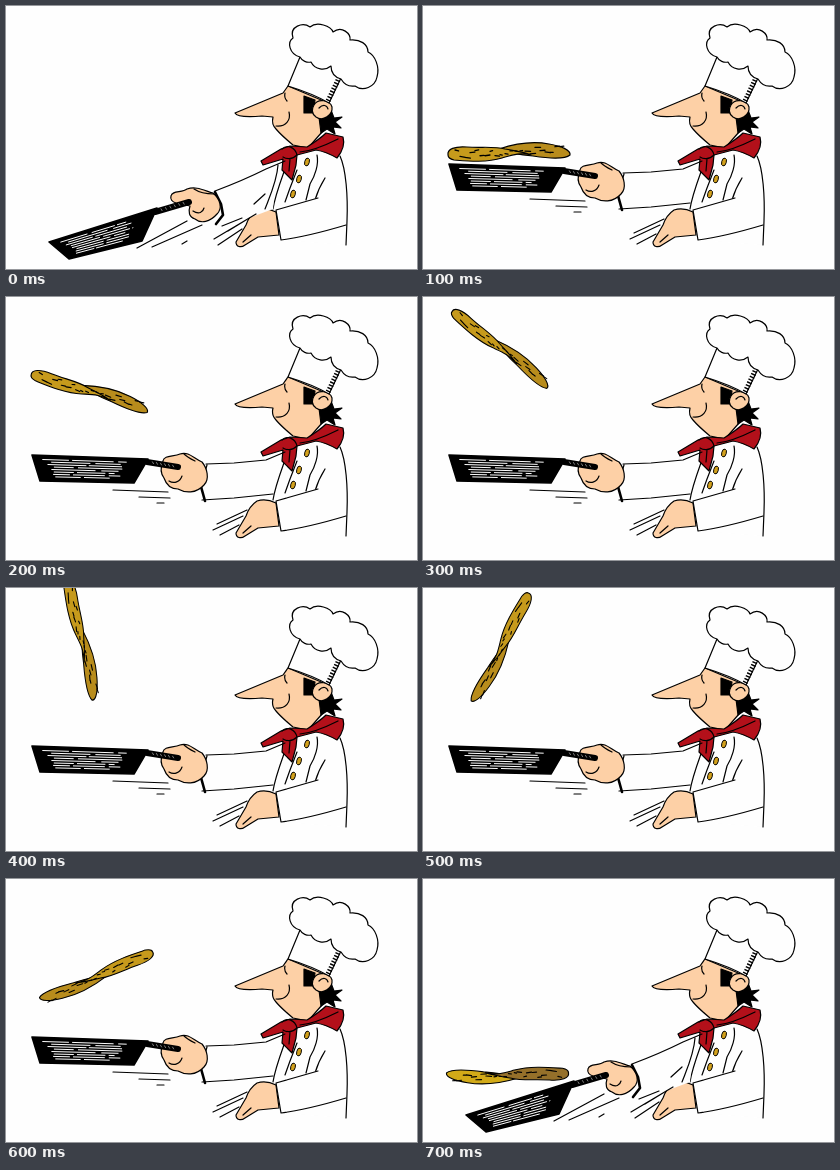
Write an HTML page that moves like this. It is 411x263 px and loops after 0.8 s.

```html
<!DOCTYPE html>
<html lang="en">
<head>
<meta charset="utf-8">
<title>Chef flipping a pancake</title>
<style>
html, body { margin: 0; width: 100%; height: 100%; overflow: hidden; background: #fefefe; }
svg { display: block; width: 100%; height: 100%; }
path { fill: none; stroke: #000; stroke-width: 1.2; stroke-linejoin: round; stroke-linecap: round; }
.skin { fill: #fdd0a6; }
.white { fill: #fefefe; }
.red { fill: #b3101a; }
.ink { fill: #000; }
.thick { stroke-width: 2.6; }
.streak { stroke: #fefefe; stroke-width: 1; stroke-linecap: butt; }
ellipse { fill: #d3a11c; stroke: #000; stroke-width: .9; }
</style>
</head>
<body>
<svg viewBox="0 0 411 263">
  <!-- jacket -->
  <path class="white" stroke="none" style="stroke:none" d="M272 158L312 145L334 150L341 190V239L276 234L268 200Z"/>
  <path d="M334 150C340 163 342 190 341 215L340 239"/>
  <path d="M311 149C313 158 309 170 304 178L300 194M279 163C274 177 269 190 267 203M291 164L284 182L279 196"/>
  <path d="M319 172C314 180 311 187 309 194"/>
  <ellipse cx="301" cy="156" rx="2.3" ry="4" transform="rotate(15 301 156)"/>
  <ellipse cx="293" cy="173" rx="2.3" ry="4" transform="rotate(15 293 173)"/>
  <ellipse cx="287" cy="188" rx="2.3" ry="4" transform="rotate(15 287 188)"/>

  <!-- resting arm -->
  <path class="skin" d="M270 206C264 203 257 202 251 204C245 208 242 213 240 219L230 236C230 241 235 242 239 239L252 231L273 229Z"/>
  <path d="M245 229L237 236"/>
  <path class="white" d="M312 192L270 204L275 235L340 220" style="stroke:none"/>
  <path d="M312 192L270 204L275 234C298 231 320 225 340 219"/>

  <!-- head -->
  <path class="skin" d="M282 80L277 87L229 107C231 111 244 111 256 110L267 111C266 115 267 120 270 123C275 129 281 134 287 139L302 142L316 126L320 96Z"/>
  <path d="M279 87C278 91 279 93 281 95M283 106C285 114 280 121 270 120"/>
  <path class="ink" d="M298 90L309 94L307 107H298ZM313 111L325 104L328 112L336 111L329 116L335 122L327 121L329 128L321 123L315 127Z"/>
  <path class="skin" d="M308 99C312 92 324 94 326 101C327 109 317 116 310 111C306 108 305 104 308 99"/>
  <path d="M313 102C317 98 321 99 322 103"/>

  <!-- hat -->
  <path class="white" d="M294 51L282 80C295 84 311 90 323 97L335 72L326 56Z"/>
  <path class="white" d="M294 51C283 48 281 36 287 32C283 20 297 16 304 21C311 15 325 20 327 26C336 19 345 28 344 34C354 33 362 38 362 46C369 49 374 61 371 71C369 81 357 86 349 80C343 81 338 78 335 73C328 71 325 66 325 60C319 65 309 64 305 56C301 57 296 55 294 51Z"/>
  <path id="hatch" class="thick" style="stroke-dasharray:1.4 1.7;stroke-linecap:butt;stroke-width:5" d="M332 74L322 95"/>

  <!-- neckerchief -->
  <path class="red" d="M255 155L275 143L284 140L301 141C309 136 315 132 320 127L337 131C339 138 336 146 331 152C324 148 316 145 310 144L291 149L290 159L286 174L276 164L277 153L257 159Z"/>
  <path d="M276 143C281 138 289 141 291 149C286 154 280 153 277 151M284 153L283 165M294 146C307 145 320 139 332 133"/>

  <g id="up">
    <path class="white" style="stroke:none" d="M200 167L259 163L274 169L266 199L199 204L195 185Z"/>
    <path d="M200 167L228 166L260 163L279 155M196 203L228 201L267 197M201 168L196 185"/>
    <path class="thick" d="M194 186L199 204"/>
    <path class="skin" d="M157 164C158 158 168 160 174 157C183 154 188 162 196 165C201 171 204 182 198 188C190 197 179 196 172 192C164 192 160 187 158 181C154 176 155 169 157 164Z"/>
    <path d="M178 157C181 160 185 162 189 164M163 184C168 187 174 185 176 179"/>
    <path d="M107 193L162 195M133 200L164 201M151 206H158M211 227L241 213M207 233L237 219M214 238L233 228"/>
  </g>

  <g id="down">
    <path class="white" style="stroke:none" d="M209 185L271 158L267 203L216 222Z"/>
    <path d="M209 185C225 179 244 171 260 163L279 155M272 159C271 175 264 190 259 203M216 220L236 212M248 198L259 188"/>
    <path class="thick" d="M209 186L215 198L217 209L210 218"/>
    <path class="skin" d="M165 190C166 184 176 187 181 183C190 180 197 184 207 187C214 193 217 202 211 208C204 216 195 218 189 213C183 211 182 206 184 200L170 197C166 196 164 193 165 190Z"/>
    <path d="M188 183C194 187 201 188 208 188M187 205C193 209 197 206 198 202"/>
    <path d="M131 242L181 215M146 241L196 219M176 238L181 235M208 233L250 208M212 239L236 223M222 225L240 214"/>
  </g>

  <g id="cake">
    <path id="right" d="M-10 -3C8 -9 24 -11 40 -8C52 -6 62 -2 61 3C55 8 37 6 24 4C12 3 0 1 -10 -3Z"/>
    <path id="left" d="M-61 3C-62 -3 -54 -6 -42 -5C-27 -4 -15 -6 -4 -3C6 -1 15 0 22 3C10 0 3 3 -7 6C-23 11 -42 9 -55 8C-59 7 -61 6 -61 3Z"/>
    <path id="spots" style="stroke-width:1.3"/>
  </g>
</svg>
<script>
const el = id => document.getElementById(id);

function random(seed) {
  return () => (seed = (seed * 16807) % 2147483647) / 2147483647;
}

function addPath(parent, d, cls, width) {
  const p = document.createElementNS('http://www.w3.org/2000/svg', 'path');
  p.setAttribute('d', d);
  p.setAttribute('class', cls);
  if (width) p.style.strokeWidth = width;
  parent.append(p);
}

// Corners run clockwise from the left end of the rim; streaks follow the sides.
function addPan(parent, corners, grip, seed) {
  const [a, b, c, d] = corners;
  const rnd = random(seed);
  const mix = (p, q, k) => p.map((v, i) => v + (q[i] - v) * k);
  const at = (u, v) => mix(mix(a, b, u), mix(d, c, u), v).map(n => n.toFixed(1));
  addPath(parent, 'M' + corners.join('L') + 'Z', 'ink', 1.6);
  let streaks = '';
  for (let v = 0.16; v < 0.88; v += 0.095) {
    let u = 0.08 + rnd() * 0.1;
    const end = 0.72 + rnd() * 0.12;
    while (u < end) {
      const stop = Math.min(end, u + 0.15 + rnd() * 0.3);
      streaks += `M${at(u, v)}L${at(stop, v)}`;
      u = stop + 0.02 + rnd() * 0.04;
    }
  }
  addPath(parent, streaks, 'streak');
  const [from, to] = grip;
  addPath(parent, `M${from}L${to}`, '', 6);
  const ticks = [];
  for (let k = 0.2; k < 0.95; k += 0.13) {
    const [x, y] = mix(from, to, k);
    ticks.push(`M${x - 1} ${y - 1.5}l1.5 2.5`);
  }
  addPath(parent, ticks.join(''), 'streak', 0.5);
}

addPan(el('up'), [[26, 158], [142, 162], [128, 186], [34, 184]], [[141, 165], [172, 170]], 7);
addPan(el('down'), [[43, 236], [151, 202], [136, 235], [63, 253]], [[149, 206], [183, 196]], 23);

const rnd = random(41);
let spots = '';
for (let i = 0; i < 22; i++) {
  const x = -54 + i * 5;
  const y = (x < 0 ? 2 : -2) + (rnd() - 0.5) * (Math.abs(x) > 12 ? 8 : 2);
  spots += `M${x} ${y}l${2 + rnd() * 4} ${rnd() * 2 - 1}`;
}
el('spots').setAttribute('d', spots);

// Pancake centre, turn in degrees and thickness for each tenth of a second.
const flight = [
  null,
  [86, 146, 0, 1],
  [84, 94, 18, 0.9],
  [78, 51, 39, 0.85],
  [76, 52, 78, 0.85],
  [79, 60, 118, 0.85],
  [91, 98, 158, 0.85],
  [84.5, 196.5, 180, 0.9]
];

function show(id, on) { el(id).style.display = on ? '' : 'none'; }

function draw(now) {
  const step = Math.floor(now / 100) % 8;
  const low = step === 0 || step === 7;
  const pose = flight[step];
  show('up', !low);
  show('down', low);
  show('cake', pose);
  if (pose) {
    const [x, y, turn, thick] = pose;
    el('cake').setAttribute('transform', `translate(${x} ${y}) rotate(${turn}) scale(1 ${thick})`);
    el('left').style.fill = step === 7 ? '#95702a' : '#c69a1c';
    el('right').style.fill = step === 7 ? '#d2aa18' : '#b88c1c';
  }
  requestAnimationFrame(draw);
}
draw(0);
</script>
</body>
</html>
```
